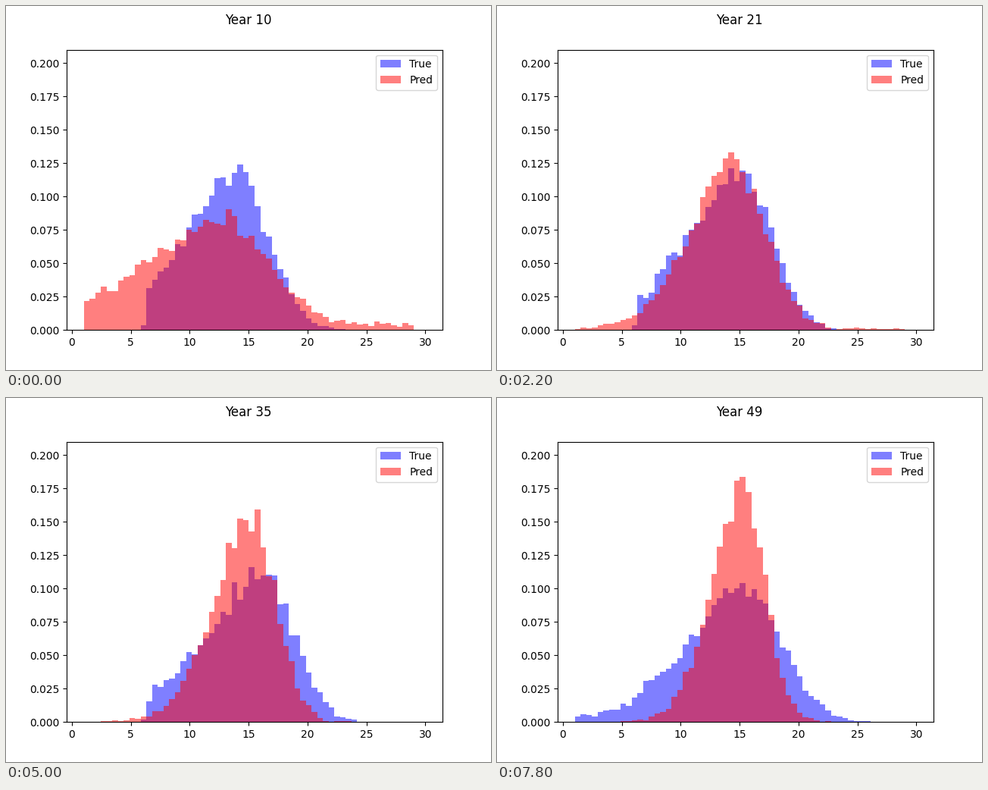
Recreate the animation shown at these times as a matplotlib script. Size 640 by 480 pixels, loop 8 s.

```python
import numpy as np
import matplotlib.pyplot as plt
from matplotlib.animation import FuncAnimation

FIRST, LAST = 10, 49
BINS = 60
CUT = 10  # lowest bin the true values reach before the late fill-in
edges = np.linspace(1, 30, BINS + 1)
idx = np.arange(BINS)


def bell(peak, height, left, right):
    """Skewed bell over the bins, with a heavier left flank."""
    d = idx - peak
    spread = np.where(d < 0, (abs(d) / left) ** 1.7, (abs(d) / right) ** 2)
    return height * np.exp(-spread)


def true_density(year):
    def at(*values):
        return np.interp(year, [FIRST, 30, LAST], values)

    density = bell(peak=at(26, 31.3, 29.5), height=at(0.120, 0.114, 0.098),
                   left=at(13, 14.5, 14.5), right=at(8.1, 7.2, 9))
    fill = np.clip((year - 40) / 9, 0, 1)
    density[:CUT] *= fill
    density[CUT] *= max(fill, 0.15)
    return density


def pred_density(year):
    def at(*values):
        return np.interp(year, [FIRST, 16, 21, 31, 40, LAST], values)

    density = bell(peak=at(24, 29, 27, 28, 29, 28.5),
                   height=at(0.079, 0.108, 0.126, 0.164, 0.145, 0.182),
                   left=at(20, 15, 10, 8.3, 8.7, 6.9),
                   right=at(11, 8, 8.3, 6.2, 6.9, 5.8))
    haze = 0.004 * np.exp((FIRST - year) / 7)
    return density + haze * (idx < 58)


def jitter(density, rng):
    """Sampling noise that grows with the square root of the density."""
    noise = 0.016 * np.sqrt(density) * rng.standard_normal(BINS)
    return np.clip(density + noise, 0, None)


def heights(year):
    rng = np.random.default_rng(year)
    return jitter(true_density(year), rng), jitter(pred_density(year), rng)


fig, ax = plt.subplots(figsize=(6.4, 4.8), dpi=100)
title = fig.suptitle(f"Year {FIRST}")


def add_bars(values, color, label):
    return ax.bar(edges[:-1], values, np.diff(edges), align="edge",
                  color=color, alpha=0.5, label=label)


true, pred = heights(FIRST)
groups = [add_bars(true, "blue", "True"), add_bars(pred, "red", "Pred")]
ax.set_xlim(-0.45, 31.45)
ax.set_ylim(0, 0.21)
ax.legend(loc="upper right")


def update(frame):
    year = FIRST + frame
    title.set_text(f"Year {year}")
    for bars, values in zip(groups, heights(year)):
        for bar, h in zip(bars, values):
            bar.set_height(h)
    return [title]


anim = FuncAnimation(fig, update, frames=LAST - FIRST + 1, interval=200,
                     repeat=True, repeat_delay=0, blit=False)
plt.show()
```
